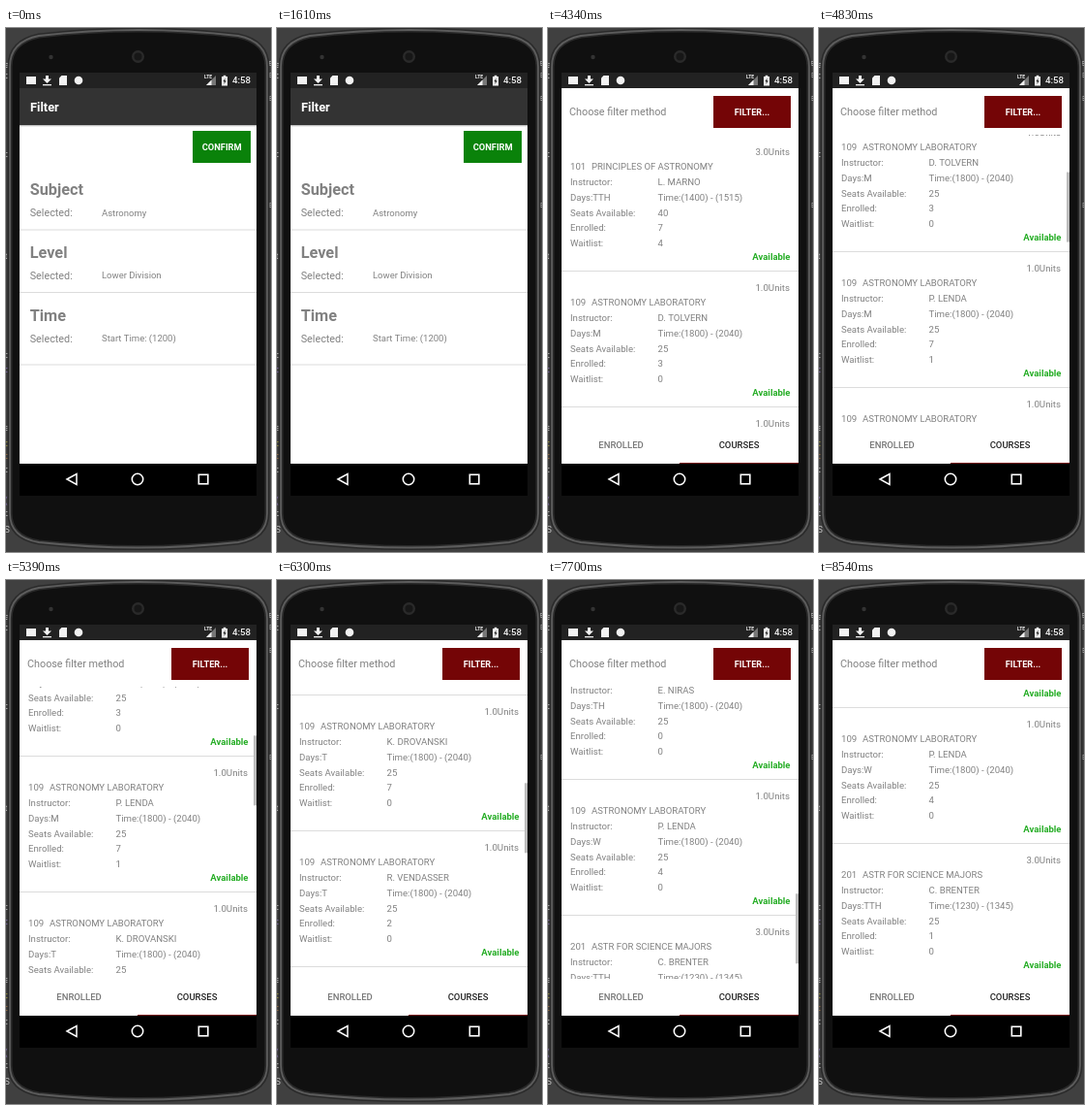
An HTML page with a canvas for the animation above (8610 ms loop, 274 px wide and 540 px high).

```html
<!DOCTYPE html>
<html lang="en">
<head>
<meta charset="utf-8">
<title>Course filter</title>
<style>
  html, body { margin: 0; width: 274px; height: 540px; overflow: hidden; background: #333; }
  canvas { display: block; }
</style>
</head>
<body>
<canvas id="stage" width="274" height="540"></canvas>
<script>
const ctx = document.getElementById('stage').getContext('2d');
const LOOP = 8610, STEP = 70;
const LIST_TOP = 110, LIST_BOTTOM = 411, ROW = 140;
const GRAY = '#818181', RED = '#740506', DIVIDER = '#dcdcdc';
const CLOSE_START = 2310, CLOSE_END = 2590;

// number, title, units, instructor, days, time, seats, enrolled, waitlist
const lab = (who, days, enrolled, wait) =>
  ['109', 'ASTRONOMY LABORATORY', '1.0', who, days, '(1800) - (2040)', 25, enrolled, wait];
const courses = [
  ['101', 'PRINCIPLES OF ASTRONOMY', '3.0', 'L. MARNO', 'TTH', '(1400) - (1515)', 40, 7, 4],
  lab('D. TOLVERN', 'M', 3, 0),
  lab('P. LENDA', 'M', 7, 1),
  lab('K. DROVANSKI', 'T', 7, 0),
  lab('R. VENDASSER', 'T', 2, 0),
  lab('F. DORM', 'W', 2, 0),
  lab('E. NIRAS', 'TH', 0, 0),
  lab('P. LENDA', 'W', 4, 0),
  ['201', 'ASTR FOR SCIENCE MAJORS', '3.0', 'C. BRENTER', 'TTH', '(1230) - (1345)', 25, 1, 0]
];

// start, end, distance, deceleration power
const flings = [
  [4400, 5530, 209.5, 3],
  [5670, 6580, 208.5, 3],
  [6860, 8120, 541, 1.815]
];

const clamp = v => Math.max(0, Math.min(1, v));
const progress = (t, a, b) => clamp((t - a) / (b - a));

function rect(x, y, w, h, color) {
  ctx.fillStyle = color;
  ctx.fillRect(x, y, w, h);
}

// y is the middle of the capital letters
function text(str, x, y, size, color = GRAY, weight = 400, align = 'left') {
  ctx.font = `${weight} ${size}px Roboto, sans-serif`;
  ctx.textAlign = align;
  ctx.fillStyle = color;
  ctx.fillText(str, x, y + size * 0.355);
}

function paint(color, stroke) {
  if (stroke) {
    ctx.strokeStyle = color;
    ctx.lineWidth = stroke;
    ctx.stroke();
  } else {
    ctx.fillStyle = color;
    ctx.fill();
  }
}

function shape(points, color, stroke) {
  ctx.beginPath();
  points.forEach(([x, y]) => ctx.lineTo(x, y));
  ctx.closePath();
  paint(color, stroke);
}

function circle(x, y, r, color, stroke) {
  ctx.beginPath();
  ctx.arc(x, y, r, 0, Math.PI * 2);
  paint(color, stroke);
}

function clipped(x, y, w, h, draw) {
  ctx.save();
  ctx.beginPath();
  ctx.rect(x, y, w, h);
  ctx.clip();
  draw();
  ctx.restore();
}

// Slivers of the code editor that show beside the phone
function drawEditor() {
  rect(0, 0, 274, 540, '#404040');
  const light = '#c4c4c4', purple = '#8a74b8', yellow = '#a8a040';
  [[38, 'a', light], [49, 'c', light], [130, 'c', light], [235, 't', light], [337, 'c', light],
   [352, 'o', purple], [412, 'e', light], [428, 'o', yellow], [441, 'o', '#a87848'],
   [455, 'c', light], [487, '(', purple], [500, 'c', light], [517, 'S', light]]
    .forEach(([y, glyph, color]) => text(glyph, -1.5, y, 9, color));
  [36, 48, 72, 182].forEach(y => text('e', 271, y, 9, light));
}

function drawPhone() {
  drawEditor();
  const body = new Path2D('M4 40 Q4 14 34 8 Q137 -4 240 8 Q270 14 270 40 V500' +
    ' Q270 525 240 530 Q137 541 34 530 Q4 525 4 500 Z');
  ctx.fillStyle = '#101010';
  ctx.fill(body);
  [[5, '#2a2a2a'], [1.8, '#5c5c5c']].forEach(([width, color]) => {
    ctx.lineWidth = width;
    ctx.strokeStyle = color;
    ctx.stroke(body);
  });
  circle(136.5, 29.5, 6.5, '#2a2a2a');
  circle(136.5, 29.5, 4, '#171717');
  circle(46.5, 30, 2.2, '#333');
}

function drawStatusIcons() {
  const white = '#f2f2f2';
  rect(21, 50, 10, 8, white);
  rect(41, 49, 3, 4, white);
  shape([[38, 52.5], [47, 52.5], [42.5, 57]], white);
  rect(38, 58, 9, 1.3, white);
  shape([[57.5, 49], [63, 49], [63, 59], [55, 59], [55, 51.5]], white);
  circle(75, 54, 4.3, white);
  text('LTE', 205, 50.5, 5, white, 700);
  shape([[217, 49], [217, 59], [207, 59]], '#777');
  shape([[212.5, 53.5], [212.5, 59], [207, 59]], white);
  rect(223, 50, 6, 9.5, white);
  rect(224.7, 48.8, 2.6, 1.5, white);
  shape([[226.6, 51.5], [224.4, 55.2], [225.8, 55.2], [225.4, 58], [227.7, 54.3], [226.3, 54.3]], '#222');
  text('4:58', 253, 54, 9.7, white, 500, 'right');
}

function drawNavIcons() {
  shape([[63, 465], [73, 459.5], [73, 470.5]], '#fff', 1.5);
  circle(136, 465, 5.7, '#fff', 1.6);
  ctx.strokeRect(199.3, 460.3, 9.5, 9.5);
}

function drawCourse(course, y, first) {
  const [number, title, units, who, days, time, seats, enrolled, wait] = course;
  if (!first) rect(14, y, 245, 1, DIVIDER);
  text(units + 'Units', 250, y + 17.5, 9.7, GRAY, 400, 'right');
  text(number, 23, y + 33, 9.6);
  text(title, 45, y + 33, 9.5);
  [['Instructor:', who], ['Days:' + days, 'Time:' + time], ['Seats Available:', seats],
   ['Enrolled:', enrolled], ['Waitlist:', wait]].forEach(([label, value], i) => {
    const rowY = y + 48.7 + i * 15.7;
    text(label, 23, rowY, 9.6);
    text(value, 113.5, rowY, 9.6);
  });
  text('Available', 250.5, y + 126, 9.5, '#25ad25', 700, 'right');
}

function drawList(t) {
  const scroll = Math.round(flings.reduce((sum, [a, b, distance, power]) =>
    sum + distance * (1 - Math.pow(1 - progress(t, a, b), power)), 0));
  clipped(14, LIST_TOP, 245, LIST_BOTTOM - LIST_TOP, () => {
    courses.forEach((course, i) => {
      const y = LIST_TOP + i * ROW - scroll;
      if (y < LIST_BOTTOM && y + ROW > LIST_TOP) drawCourse(course, y, i === 0);
    });
    if (t > flings[0][0]) {
      ctx.globalAlpha = 1 - progress(t, 8280, 8530);
      rect(256, LIST_TOP + scroll * 0.241, 3, 72, '#bdbdbd');
    }
  });
}

function drawCourseScreen(t) {
  rect(14, 62, 245, 387, '#fff');
  text('Choose filter method', 22, 86, 10.8);
  rect(171, 70, 80, 33, RED);
  text('FILTER...', 211, 86.8, 9.2, '#fff', 700, 'center');
  if (t >= CLOSE_END) drawList(t);
  text('ENROLLED', 75.5, 430, 9.5, '#777', 500, 'center');
  text('COURSES', 197.5, 430, 9.5, '#222', 500, 'center');
  rect(136, 448, 123, 1, RED);
}

function drawFilterScreen() {
  rect(14, 47, 245, 15, '#222');
  rect(14, 62, 245, 387, '#fff');
  rect(14, 62, 245, 38, '#333');
  rect(14, 100, 245, 1, '#c4c4c4');
  rect(14, 101, 245, 1, '#ececec');
  text('Filter', 25, 81.5, 12.8, '#fff', 700);
  rect(193, 106, 60, 33, '#0a820a');
  text('CONFIRM', 223.2, 122.4, 9.3, '#fff', 700, 'center');
  [['Subject', 'Astronomy'], ['Level', 'Lower Division'], ['Time', 'Start Time: (1200)']]
    .forEach(([title, value], i) => {
      const y = 166.3 + i * 64.8;
      text(title, 24.7, y, 16.3, GRAY, 700);
      text('Selected:', 24.7, y + 24, 10.8);
      text(value, 99, y + 24, 9.5);
    });
  [207.5, 272, 346.5].forEach(y => rect(14, y, 245, 1, DIVIDER));
}

// The filter screen is kept as one layer so it fades as a whole.
function renderFilterLayer() {
  const layer = document.createElement('canvas');
  layer.width = 274;
  layer.height = 540;
  drawFilterScreen();
  layer.getContext('2d').drawImage(ctx.canvas, 0, 0);
  return layer;
}

const filterLayer = renderFilterLayer();

function drawScene(t) {
  const closing = progress(t, CLOSE_START, CLOSE_END);
  drawPhone();
  rect(14, 46, 245, 16, '#222');
  rect(14, 449, 245, 33, '#000');
  clipped(14, 62, 245, 420, () => {
    if (closing > 0) {
      drawCourseScreen(t);
      rect(14, 62, 245, 387, `rgba(0,0,0,${0.22 * (1 - closing)})`);
    }
    if (closing < 1) {
      ctx.globalAlpha = 1 - closing;
      ctx.drawImage(filterLayer, 0, Math.round(26 * closing * closing));
    }
  });
  drawStatusIcons();
  drawNavIcons();
}

const start = performance.now();

function frame() {
  const t = (performance.now() - start) % LOOP;
  drawScene(Math.floor(t / STEP) * STEP);
  requestAnimationFrame(frame);
}
frame();
</script>
</body>
</html>
```
